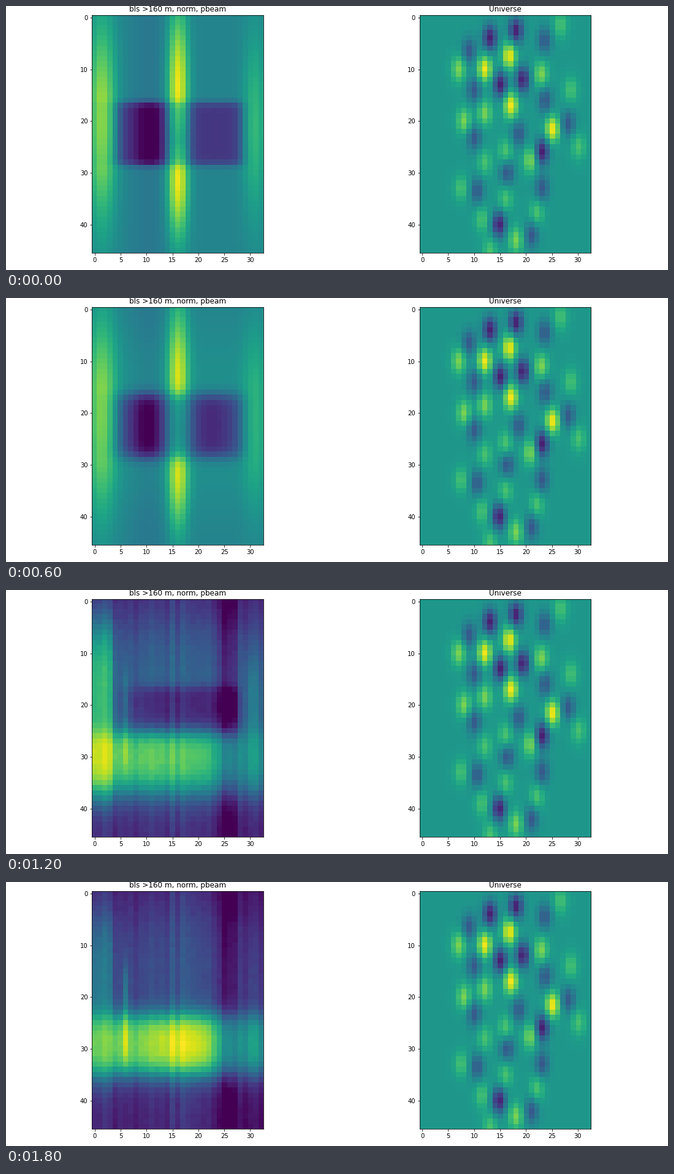
Recreate the animation shown at these times as a matplotlib script. Size 1080 by 432 pixels, loop 2 s.

```python
import numpy as np
import matplotlib.pyplot as plt
from matplotlib.animation import FuncAnimation

WIDTH, HEIGHT, DPI = 1080, 432, 72
COLS, ROWS = 33, 46
STEPS, CRISP_STEPS = 10, 5
C, R = np.meshgrid(np.arange(COLS), np.arange(ROWS))

plt.rcParams["font.family"] = "DejaVu Sans"
rng = np.random.default_rng(4)
STREAKS = rng.normal(0, 0.02, COLS) + rng.normal(0, 0.006, (ROWS, COLS))


def bell(x, center, width):
    return np.exp(-0.5 * ((x - center) / width) ** 2)


def rise(x, edge, soft):
    return 1 / (1 + np.exp((edge - x) / soft))


def box(x, low, high, soft):
    return rise(x, low, soft) * rise(-x, -high, soft)


def beam(dx, dy):
    return bell(dx, 0, 0.95) * bell(dy, 0, 1.75)


# Sources of the static sky, grouped by brightness against the background
SOURCES = {
    -0.44: [(15, 13), (18, 2.6), (13, 4), (19.3, 12), (23, 26), (14.7, 40)],
    -0.25: [(23.5, 4.5), (10, 23.3), (18.5, 22.5), (28, 20.5), (10.5, 33.5),
            (21, 42), (23.6, 16), (10, 14), (16.3, 30), (23, 33), (9, 6.5)],
    0.45: [(17, 17), (25, 21.6), (12, 10), (16.7, 7.5)],
    0.27: [(7, 10), (20.7, 27.6), (8, 20), (12, 18.5), (22.8, 11), (18, 43)],
    0.18: [(16, 26), (12, 28), (16, 35), (22, 37.7), (7.5, 33), (28.5, 14),
           (26.5, 1.5), (30, 25), (13, 45), (11.5, 39)],
}


def sky():
    x, y = np.array(sum(SOURCES.values(), [])).T
    offset = np.repeat(list(SOURCES), [len(group) for group in SOURCES.values()])
    overlap = beam(x[:, None] - x, y[:, None] - y)
    strength = np.linalg.solve(overlap, offset)
    return 0.53 + beam(C[..., None] - x, R[..., None] - y) @ strength


def two_holes(p):
    """Two dark holes between bright columns; p runs from crisp to diffuse."""
    inside = box(R, 16.5, 28.5, 0.35 + 0.5 * p)
    base = 0.45 + 0.07 * p * np.exp(-((R - 21) / 17) ** 4) - 0.05 * bell(C, 10.5, 2.5)

    left = 0.42 * bell(R, 20, 14) * bell(C, 1.5, 1.9)
    left *= (1 - 0.25 * p) * (1 - 0.1 * inside)
    flares = np.maximum(bell(R, 13.5, 10.5), bell(R, 31.5, 8))
    middle = 0.53 * flares * bell(C, 16.1, 1.4)
    middle *= (1 - 0.2 * p) * (1 - (0.4 + 0.55 * p) * inside)
    right = 0.22 * (1 - 0.4 * p) * bell(R, 21, 13) * bell(C, 30.8, 1.6)

    soft = 0.55 + 0.3 * p
    holes = (0.27 * box(C, 4.2, 13.9, soft) + 0.29 * box(C, 18.2, 28.4, soft)
             + (0.17 + 0.05 * p) * bell(C, 10.7 - 0.6 * p, 2.2)
             + 0.13 * p * bell(C, 22.5, 2.5))
    return base + left + middle + right - holes * inside


def bright_band(q):
    """One wide hole giving way to a bright band; q counts steps, then settles."""
    def mix(*stops):
        return np.interp(q, range(len(stops)), stops)

    plateau = np.exp(-((R - 20) / 17) ** 4)
    ridge = box(C, -2, 3.6, 0.3)
    right = bell(C, 30.4, 1.3)

    back = mix(0.28, 0.13, 0.11) + mix(0.34, 0.18, 0.12) * plateau
    back += mix(0.24, 0.36, 0.17) * ridge * plateau
    back += mix(0, 0.03, 0.08) * bell(C, 18, 3)
    back += mix(0.1, 0.14, 0.02) * right * box(R, 12, 30, 2)
    back -= mix(0.12, 0.02, 0.06) * C / COLS
    back -= mix(0.04, 0.16, 0.12) * box(C, 23.5, 27.5, 0.4)
    hole = np.clip((C - 3) / 8, 0.15, 1) * box(C, 3.5, 27.8, 0.5)
    back -= mix(0.55, 0.2, 0) * hole * box(R, 16.6, 30, 0.5)

    level = mix(0.8, 0.77, 0.8) + mix(0.14, 0.17, 0.08, 0.04, 0) * ridge
    level += mix(0, 0, 0.19) * bell(C, 17.5, 4.2) + 0.12 * right
    level -= mix(0.28, 0.31, 0.33) * rise(C, 23.3, mix(2.5, 1, 0.8))

    upper_edge = rise(R, mix(27, 25.4, 23.8), mix(0.9, 1, 1.2))
    lower_edge = rise(-R, -mix(40, 36.3, 34.6), mix(2, 1.8, 1.3))
    weight = upper_edge * lower_edge
    stripe = mix(0.08, 0.12, 0.18) * bell(C, 6, 0.4) * box(R, 14, 33, 1.5)
    return back * (1 - weight) + level * weight + stripe + STREAKS


def field(step):
    if step < CRISP_STEPS:
        return two_holes(step / (CRISP_STEPS - 1))
    return bright_band(step - CRISP_STEPS)


fig = plt.figure(figsize=(WIDTH / DPI, HEIGHT / DPI), dpi=DPI, facecolor="white")


def panel(left, title, data):
    ax = fig.add_axes([left / WIDTH, 27.8 / HEIGHT, 279.2 / WIDTH, 389.2 / HEIGHT])
    image = ax.imshow(data, cmap="viridis", vmin=0, vmax=1, aspect="auto",
                      interpolation="nearest")
    ax.set_title(title, fontsize=12)
    ax.set_xticks(range(0, COLS, 5))
    ax.set_yticks(range(0, ROWS, 10))
    ax.tick_params(labelsize=10)
    return image


beam_map = panel(140.4, "bls >160 m, norm, pbeam", field(0))
panel(674.9, "Universe", sky())


def update(step):
    beam_map.set_data(field(step))
    return [beam_map]


animation = FuncAnimation(fig, update, frames=STEPS, interval=200,
                          repeat=True, repeat_delay=0)
plt.show()
```
